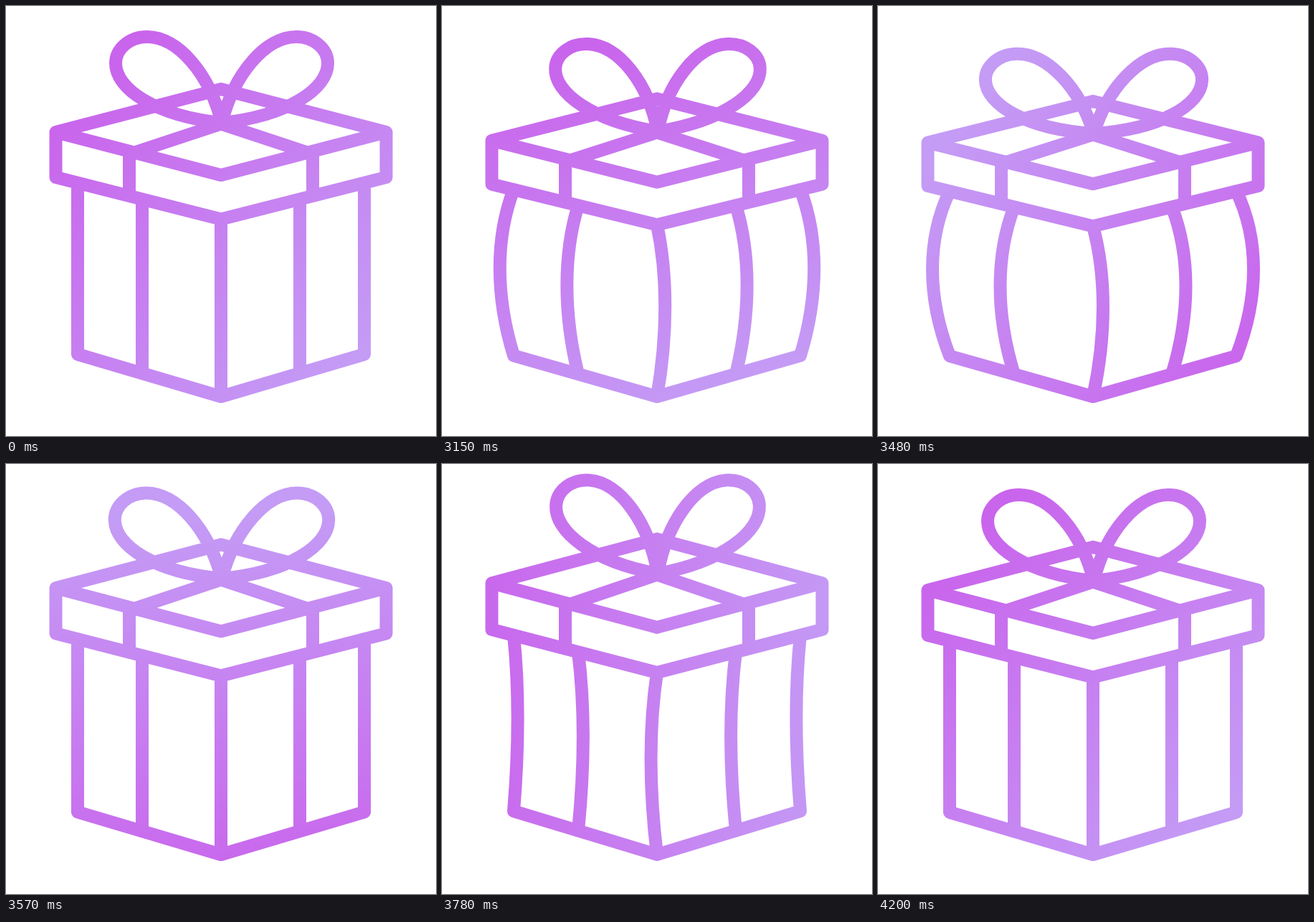
An HTML page with a canvas that plays this animation: 600x600 px, repeating every 4230 ms.

```html
<!DOCTYPE html>
<html lang="en">
<head>
<meta charset="utf-8">
<title>Gift box</title>
<style>
  html, body { margin: 0; width: 100%; height: 100%; overflow: hidden; background: #fff; }
  canvas { display: block; width: 100vw; height: 100vh; }
</style>
</head>
<body>
<canvas id="stage" width="600" height="600"></canvas>
<script>
const ctx = document.getElementById('stage').getContext('2d');

const LOOP = 4230, REST = 3000, STEP = 30;
const MID = 300, BASE = 545, KNOT_X = 301, KNOT_Y = 163, REACH = 265;

const progress = (k, from, to) => Math.min(1, Math.max(0, (k - from) / (to - from)));

function ease(k, from, to) {
  const u = progress(k, from, to);
  return u * u * (3 - 2 * u);
}

const settle = (k, power) => 1 - (1 - progress(k, 22, 40)) ** power;

// Squash down, pop up past the rest height, then settle
function pose(k) {
  const squash = ease(k, 0, 7) - ease(k, 16, 22);
  const pop = ease(k, 16, 22);
  const turn = ease(k, 0, 33);
  return {
    height: 1 - .0395 * squash + .056 * (pop - settle(k, 3)),
    bulge: squash - (pop - settle(k, 1.5)),
    swing: 5 * ease(k, 0, 8) - 7.2 * ease(k, 8, 16) + 6.2 * ease(k, 16, 26) - 4 * ease(k, 26, 40),
    angle: 225 + 360 * turn,
    drift: 40 * Math.sin(Math.PI * turn)
  };
}

const radians = degrees => degrees * Math.PI / 180;

function line(...points) {
  points.forEach(([x, y], i) => i ? ctx.lineTo(x, y) : ctx.moveTo(x, y));
}

function lidHalf(side) {
  const at = (d, y) => [MID + side * d, y];
  line(at(0, 116), at(230.5, 176), at(0, 236));
  line(at(230.5, 176), at(230.5, 239), at(0, 297.5));
  line(at(128, 203), at(128, 265));
  line(at(121, 204.5), at(0, 164.5));
}

function box(bulge) {
  for (const dx of [-200, -110, 0, 110, 200]) {
    const d = Math.abs(dx), x = MID + dx;
    const top = 297.5 - .255 * d, bottom = BASE - .295 * d, h = bottom - top;
    const depth = bulge > 0 ? 14 + .05 * d : 12 - .02 * d;
    const bend = x + (dx < 0 ? -1 : 1) * bulge * depth * 4 / 3;
    ctx.moveTo(x, top);
    ctx.bezierCurveTo(bend, top + h * .29, bend, top + h * .64, x, bottom);
  }
  line([100, 486], [MID, BASE], [500, 486]);
}

function bowHalf(side, swing) {
  ctx.save();
  ctx.translate(KNOT_X, KNOT_Y);
  ctx.scale(side, 1);
  ctx.rotate(radians(swing));
  ctx.moveTo(0, 0);
  ctx.bezierCurveTo(-17, -68, -61, -120, -104, -120);
  ctx.bezierCurveTo(-129, -120, -148, -103, -148, -83);
  ctx.bezierCurveTo(-148, -48, -94, -10, 0, 0);
  ctx.restore();
}

function sheen({ angle, drift }) {
  const along = r => [MID + r * Math.cos(radians(angle)), MID + r * Math.sin(radians(angle))];
  const gradient = ctx.createLinearGradient(...along(drift + REACH), ...along(drift - REACH));
  gradient.addColorStop(0, '#c964ec');
  gradient.addColorStop(1, '#c49bf5');
  return gradient;
}

function paint(k) {
  const now = pose(k);
  ctx.fillStyle = '#fff';
  ctx.fillRect(0, 0, 600, 600);

  ctx.beginPath();
  ctx.save();
  ctx.translate(0, BASE);
  ctx.scale(1, now.height);
  ctx.translate(0, -BASE);
  for (const side of [-1, 1]) {
    lidHalf(side);
    bowHalf(side, now.swing);
  }
  box(now.bulge);
  ctx.restore();

  // Stroke outside the transform so line weight and gradient stay even
  ctx.lineWidth = 18;
  ctx.lineCap = ctx.lineJoin = 'round';
  ctx.strokeStyle = sheen(now);
  ctx.stroke();
}

const start = performance.now();

function tick() {
  const t = (performance.now() - start) % LOOP;
  paint(Math.max(0, Math.floor((t - REST) / STEP)));
  requestAnimationFrame(tick);
}
tick();
</script>
</body>
</html>
```
